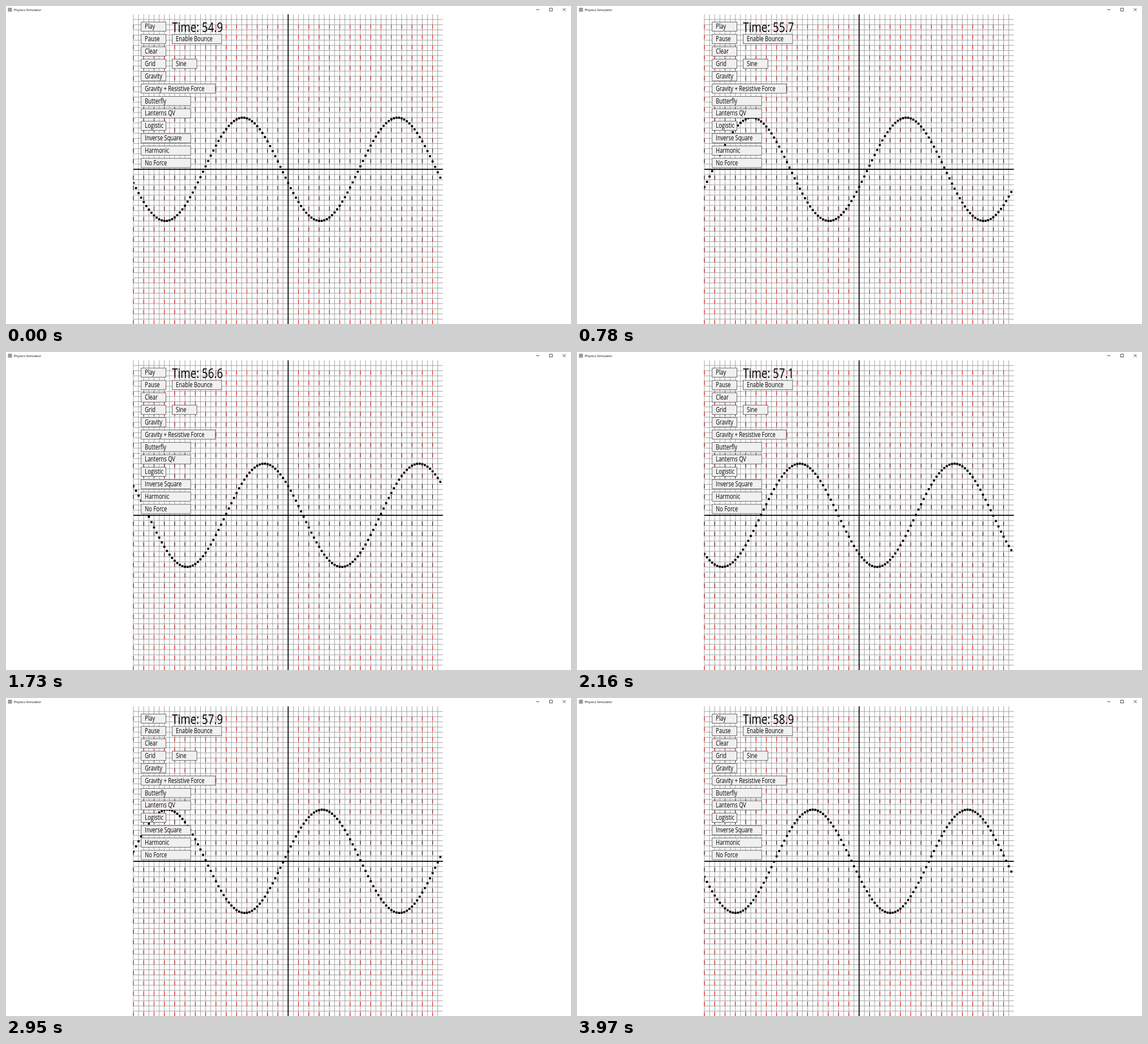
Animation, 998 px wide and 561 px high, one loop 4.02 s. Source, as an HTML page with a canvas:

```html
<!DOCTYPE html>
<html lang="en">
<head>
<meta charset="utf-8">
<title>Physics Simulator</title>
<style>
html, body { margin: 0; width: 100%; height: 100%; overflow: hidden; background: #fff; }
canvas { display: block; width: 998px; height: 561px; }
</style>
</head>
<body>
<canvas id="stage" width="998" height="561"></canvas>
<script>
const W = 998, H = 561, LOOP = 4020;
const CX = 498.4, CY = 288.1, UNIT = 9.112, HALF = 30;
const LEFT = CX - HALF * UNIT, TOP = CY - HALF * UNIT, SIZE = 2 * HALF * UNIT;
const FACE = '"Open Sans", "Noto Sans", sans-serif';
const CONDENSED = 0.78;

// Bursts of redraws: first time, last time, number of steps
const BURSTS = [
  [30, 540, 12], [590, 1070, 11], [1120, 1600, 11], [1650, 2160, 12],
  [2210, 2710, 12], [2760, 3280, 12], [3330, 3840, 12], [3890, 3970, 3]
];

// Label, column, row, width in cells
const BUTTONS = [
  ['Play', 0, 0, 1], ['Pause', 0, 1, 1], ['Clear', 0, 2, 1], ['Grid', 0, 3, 1],
  ['Gravity', 0, 4, 1], ['Gravity + Resistive Force', 0, 5, 3],
  ['Butterfly', 0, 6, 2], ['Lanterns QV', 0, 7, 2], ['Logistic', 0, 8, 1],
  ['Inverse Square', 0, 9, 2], ['Harmonic', 0, 10, 2], ['No Force', 0, 11, 2],
  ['Enable Bounce', 1, 1, 2], ['Sine', 1, 3, 1]
];

const ctx = document.getElementById('stage').getContext('2d');
const px = x => CX + x * UNIT;
const py = y => CY - y * UNIT;

function layer(paint) {
  const canvas = document.createElement('canvas');
  canvas.width = W;
  canvas.height = H;
  paint(canvas.getContext('2d'));
  return canvas;
}

function line(g, x1, y1, x2, y2, color, width) {
  g.strokeStyle = color;
  g.lineWidth = width;
  g.beginPath();
  g.moveTo(x1, y1);
  g.lineTo(x2, y2);
  g.stroke();
}

function text(g, str, x, y, size, squeeze = 1) {
  g.save();
  g.translate(x, y);
  g.scale(squeeze, 1);
  g.font = size + 'px ' + FACE;
  g.fillStyle = '#000';
  g.fillText(str, 0, 0);
  g.restore();
}

function paintField(g) {
  g.fillStyle = '#fff';
  g.fillRect(0, 0, W, H);
  for (let i = -HALF; i < HALF; i++) {
    line(g, px(i), TOP, px(i), H, '#999', 0.9);
    line(g, LEFT, py(i), LEFT + SIZE, py(i), '#999', 0.9);
  }
  // Restoring force: dashes point to the axis and redden with distance
  for (let x = -HALF; x < HALF; x += 2) {
    for (let y = -HALF; y < HALF; y += 2) {
      const red = Math.min(255, Math.abs(y) * 10);
      const tip = py(y) + Math.sign(y) * 7.3;
      line(g, px(x), py(y), px(x), tip, `rgb(${red},0,0)`, 1.05);
    }
  }
  line(g, LEFT, CY, LEFT + SIZE, CY, '#000', 1.7);
  line(g, CX, TOP, CX, H, '#000', 1.7);
}

function paintControls(g) {
  for (const [label, col, row, cells] of BUTTONS) {
    const x = 238.7 + col * 54.7, y = 28.2 + row * 21.87;
    g.fillStyle = '#f0f0f0';
    g.fillRect(x, y, cells * 43.75, 16.4);
    g.strokeStyle = '#444';
    g.lineWidth = 0.8;
    g.strokeRect(x, y, cells * 43.75, 16.4);
    text(g, label, x + 6.6, y + 12.2, 12, CONDENSED);
  }
  g.fillStyle = '#999';
  g.fillRect(3.5, 3, 7, 7);
  text(g, 'Physics Simulator', 13.8, 8.7, 5.95);
  line(g, 936.5, 6.6, 942, 6.6, '#000', 0.7);
  g.lineWidth = 0.7;
  g.strokeRect(960.2, 3.9, 4.9, 4.9);
  line(g, 983.6, 3.9, 988.6, 8.9, '#000', 0.7);
  line(g, 988.6, 3.9, 983.6, 8.9, '#000', 0.7);
}

const field = layer(paintField);
const controls = layer(paintControls);

// Latest redraw time at or before ms
function stepTime(ms) {
  let last = 0;
  for (const [start, end, count] of BURSTS) {
    for (let i = 0; i < count; i++) {
      const t = Math.round((start + (end - start) * i / (count - 1)) / 10) * 10;
      if (t > ms) return last;
      last = t;
    }
  }
  return last;
}

function simSeconds(step) {
  if (!step) return 0;
  return (step + 24 + Math.max(0, step - 2900) * 0.017) / 1000;
}

function drawWave(t) {
  const phase = 3.4085 + Math.PI * t;
  const d = 3.7;
  ctx.save();
  ctx.beginPath();
  ctx.rect(LEFT, TOP, SIZE, SIZE);
  ctx.clip();
  ctx.fillStyle = '#000';
  for (let x = -HALF; x < HALF; x += 0.5) {
    const y = 10 * Math.sin(x * Math.PI / 15 + phase);
    ctx.fillRect(px(x) - d / 2, py(y) - d / 2, d, d);
  }
  ctx.restore();
}

function frame() {
  const t = simSeconds(stepTime(performance.now() % LOOP));
  ctx.drawImage(field, 0, 0);
  drawWave(t);
  ctx.drawImage(controls, 0, 0);
  text(ctx, 'Time: ' + (54.9 + t).toFixed(1), 293.2, 46, 24, CONDENSED);
  requestAnimationFrame(frame);
}
frame();
</script>
</body>
</html>
```
